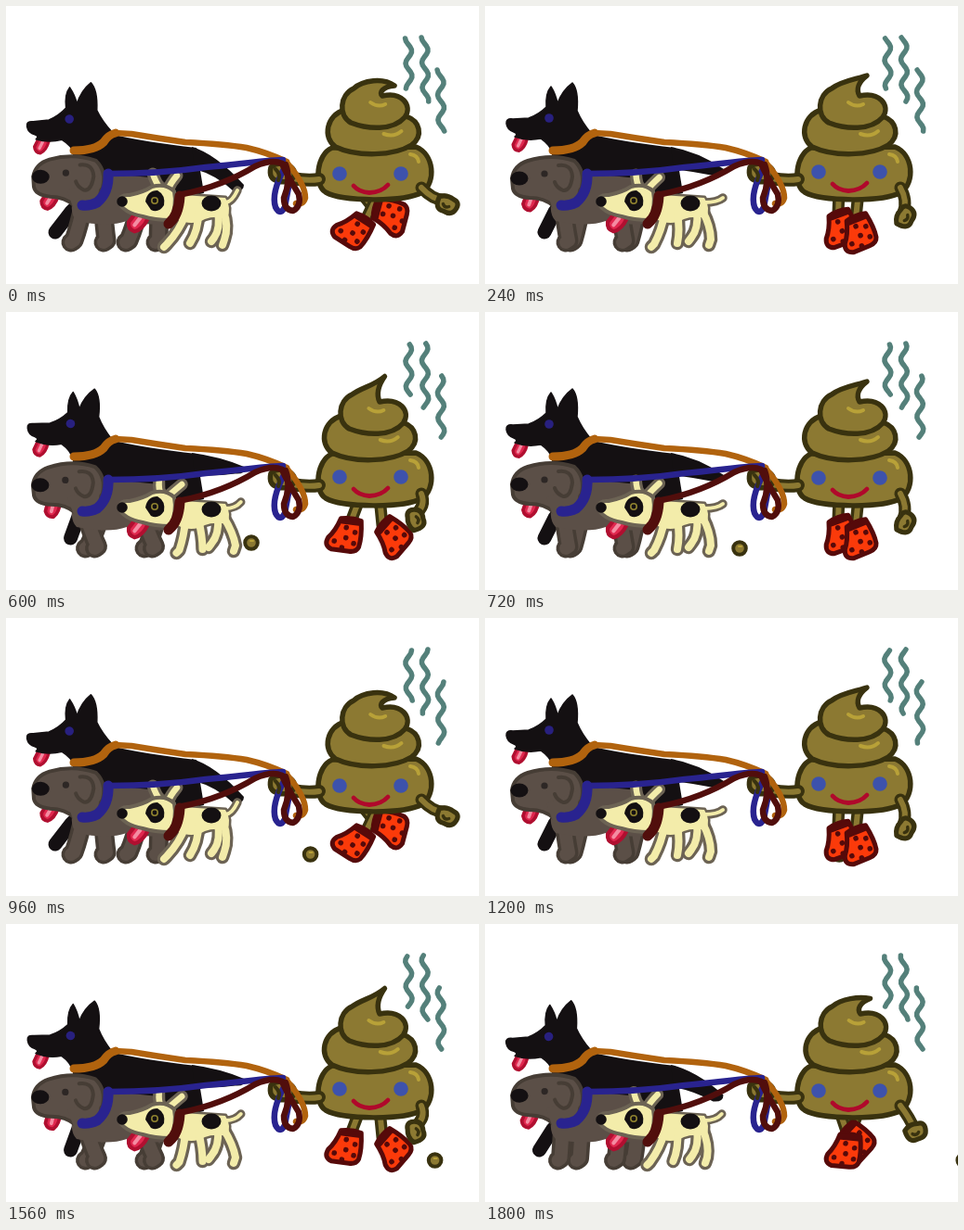
Recreate the animation shown at these times as an HTML page. Size 509 by 300 pixels, loop 1.92 s.

```html
<!DOCTYPE html>
<html lang="en">
<head>
<meta charset="utf-8">
<title>Dog walk</title>
<style>
html, body { margin: 0; width: 100%; height: 100%; overflow: hidden; background: #fff; }
svg { display: block; width: 100vw; height: 100vh; }
</style>
</head>
<body>
<svg id="stage" viewBox="0 0 509 300" fill="none" stroke-linecap="round" stroke-linejoin="round"></svg>
<script>
const STEP = 120, STEPS = 16;
const INK = '#141012', GREY = '#5b4f47', GREY_LINE = '#463d35',
  CREAM = '#f3ecaa', CREAM_LINE = '#6c6354', OLIVE = '#8c7932', OLIVE_LINE = '#39320f',
  SHINE = '#b8a138', EYE = '#3d52ac', ORANGE = '#b1630e', BLUE = '#29238f',
  WINE = '#510e0c', STEAM = '#54807a';

const fill = (d, color) => `<path d="${d}" fill="${color}"/>`;
const line = (d, color, w) => `<path d="${d}" stroke="${color}" stroke-width="${w}"/>`;
const shape = (d, color, edge, w) =>
  `<path d="${d}" fill="${color}" stroke="${edge}" stroke-width="${w}"/>`;
const dot = (x, y, rx, color, ry = rx) =>
  `<ellipse cx="${x}" cy="${y}" rx="${rx}" ry="${ry}" fill="${color}"/>`;
const turn = (a, x, y, s) => `<g transform="rotate(${a} ${x} ${y})">${s}</g>`;
const limb = (d, color, edge, w, inner) => line(d, edge, w) + line(d, color, inner);

function tongue(x, y, a, s = 1) {
  return `<g transform="translate(${x} ${y}) rotate(${a}) scale(${s})">` +
    shape('M-5 -7L5 -7Q7 2 3 7Q-2 9 -5 4Z', '#e0284f', '#b00f30', 3) +
    line('M0 -4L0 3', '#f48ca2', 3) + '</g>';
}

function blackDog(c) {
  const tx = 252 - c, ty = 179 + 17 * c;
  const body = fill('M72 160L112 138Q150 147 205 153L213 202L170 212L130 228L72 215Z', INK);
  const tail = fill(`M200 152Q${229 - 4 * c} ${157 + 2 * c} ${tx + 5} ${ty - 3}` +
    `Q${tx + 5} ${ty + 5} ${tx - 6} ${ty + 4}Q226 ${179 + 3 * c} 203 176Z`, INK);
  const legs = line(`M92 200L${75 - 5 * c} 222L${64 - 11 * c} 244`, INK, 15);
  const head = turn(-2.8 * c, 88, 138,
    tongue(37, 148, 26 + 4 * c, 1.1) +
    shape('M23 127Q22 121 30 122L47 121Q58 117 66 109Q65 94 71 87Q76 95 78 105' +
      'Q83 91 94 83Q101 91 99 113Q104 125 114 137L100 158L72 158' +
      'Q70 150 60 143Q45 146 32 141Q36 138 31 136Q24 134 23 127Z', INK, INK, 1.5) +
    dot(69, 121, 4.8, '#28207f'));
  return legs + body + tail + head + line('M73 156Q96 156 105 147Q110 139 118 137', ORANGE, 9);
}

function greyDog(c) {
  const leg = (hx, fx) => `M${hx} 212Q${(hx + fx) / 2} 238 ${fx} 253L${fx - 3} 255`;
  const legs = [[104, 95 + 13 * c], [84, 90 - 17 * c], [165, 156 + 8 * c], [145, 151 - 19 * c]]
    .map(([h, f]) => limb(leg(h, f), GREY, GREY_LINE, 21, 14)).join('');
  const body = fill('M75 195L104 179Q140 184 165 186Q192 205 180 234Q150 238 130 232Q110 239 76 232Q66 222 75 195Z', GREY);
  const head = turn(1.5 * c, 100, 195,
    tongue(48.5 - 2 * c, 211, 20 + 10 * c, 1.25) +
    shape('M29 186Q31 172 46 167Q72 159 96 167Q108 178 104 196Q92 214 74 216Q64 207 48 207' +
      'Q32 206 30 197Z', GREY, GREY_LINE, 4) +
    fill('M66 200L102 185L98 215L74 222Z', GREY) +
    dot(37, 186, 9.5, INK, 7.5) + dot(64, 181, 3.6, '#2d2725') +
    line('M79 172Q93 170 94 184Q92 200 84 199Q77 196 75 190', GREY_LINE, 4));
  return legs + body + head + line('M110 181Q111 201 98 212Q90 216 82 215', BLUE, 11);
}

function smallDog(c) {
  const legs = [
    `M193 225Q${190 - 3 * c} 242 ${182 - 9 * c} 257L${179 - 9 * c} 260`,
    `M207 224Q${210 - 3 * c} 242 ${207 - 9 * c} 256`,
    `M228 222Q${230 + c} 240 ${222 + 2 * c} 250L${219 + 2 * c} 254`,
    `M234 221Q${243 - 3 * c} 238 ${243 - 8 * c} 252L${241 - 8 * c} 258`
  ];
  const tip = [256 + 2 * c - 9 * c * c, 207 - 8 * c * c];
  const tail = `M236 212Q${tip[0] - 6} 212 ${tip}`;
  const body = 'M176 203Q205 205 236 207Q243 218 238 229Q224 226 214 230Q200 238 184 230Z';
  const ear = (x, tx, ty) => limb(`M${x} 199Q${(x + tx) / 2 - 2} ${ty + 8} ${tx} ${ty}`, CREAM, CREAM_LINE, 13, 6.5);
  const outline = legs.map(d => line(d, CREAM_LINE, 14.5)).join('') +
    line(tail, CREAM_LINE, 9.5) + line(body, CREAM_LINE, 5);
  const inside = fill(body, CREAM) + legs.map(d => line(d, CREAM, 8)).join('') + line(tail, CREAM, 4);
  return outline + inside + dot(221, 213, 10.5, INK, 8.5) +
    tongue(141, 233, 38, 1.4) +
    ear(167, 162.5 - 4.5 * c, 182 - c) + ear(174, 187.5 - 3.5 * c, 185 - 2 * c) +
    shape('M121 211Q123 203 133 204Q148 201 157 195Q172 191 181 200Q184 216 177 231' +
      'Q160 231 147 227Q126 223 121 211Z', CREAM, CREAM_LINE, 4) +
    dot(125, 211, 5.8, INK) + fill('M150 211Q152 199 163 199Q172 204 170 215Q164 224 156 220Z', INK) +
    dot(160, 210, 4, '#8f822f') + dot(160, 210, 2.4, INK) +
    line('M187 205Q186 226 175 235', WINE, 11);
}

function boot(x, y, a) {
  const spots = [[-4, 10], [6, 14], [-3, 21], [-15, 26], [6, 26], [-6, 32]];
  return `<g transform="translate(${x} ${y}) rotate(${a})">` +
    shape('M-11 1Q0 -2 11 1Q14 18 12 29Q10 35 2 35L-17 35Q-26 32 -22 23Q-15 15 -11 1Z', '#fb3a0a', '#560a0a', 5) +
    line('M-9 3L9 3', '#560a0a', 7) +
    spots.map(([sx, sy]) => dot(sx, sy, 2.8, '#560a0a')).join('') + '</g>';
}

function legs(c) {
  const a = [380 + 17 * c, 222 - 3 * c - c * c, -20 - 55 * c];
  const b = [399 - 12 * c, 227 - c + 3 * c * c, -22 + 55 * c];
  const shin = (hx, [x, y]) => limb(`M${hx} 200L${x} ${y + 2}`, OLIVE, OLIVE_LINE, 13, 6);
  return shin(381, a) + shin(402, b) + boot(...a) + boot(...b);
}

function freeArm(c) {
  const hx = 452 + 22 * c, hy = 228 - 14 * c * c;
  const hand = `<g transform="translate(${hx} ${hy}) rotate(${-60 + 85 * c}) scale(1.15)">` +
    shape('M-9 -4Q-3 -9 4 -7Q11 -7 10 0Q9 8 0 7Q-9 9 -9 -4Z', OLIVE, OLIVE_LINE, 4.5) +
    line('M-3 1Q0 4 3 1', OLIVE_LINE, 3) + '</g>';
  return limb(`M447 196Q${455 + 5 * c} 210 ${hx - 2} ${hy - 5}`, OLIVE, OLIVE_LINE, 13, 6) + hand;
}

function walker(c, blink) {
  const m = 2.5 * c, t = 1.2 * c, tx = 411 + 7 * c, ty = 75 + 11 * c;
  const tier = d => shape(d, OLIVE, OLIVE_LINE, 5.5);
  const base = tier('M351 153C334 160 331 193 344 201C362 211 428 212 448 201C463 190 461 160 441 152Z');
  const mid = tier(`M${362 + m} 112C${342 + m} 118 ${338 + m} 142 ${352 + m} 152` +
    `C${375 + m} 163 ${415 + m} 162 ${434 + m} 150C${447 + m} 140 ${443 + m} 124 ${428 + m} 119Z`);
  const top = tier(`M${370 + t} 126C${356 + t} 118 ${358 + t} 96 ${373 + t} 89` +
    `C${383 + c} ${81 - c} ${399 + 7 * c} ${79 - 2 * c} ${tx} ${ty}` +
    `C${402 + 3 * c} ${82 + 5 * c} ${399 + 2 * c} ${90 + 4 * c} ${403 + 2 * c} 97` +
    `C${424 + t} 92 ${437 + t} 107 ${428 + t} 120C${415 + t} 135 ${388 + t} 133 ${370 + t} 126Z`);
  const shine = line(`M${391 + t} 104Q${399 + t} 110 ${407 + t} 106`, SHINE, 4) +
    line(`M${404 + m} 138Q${415 + m} 142 ${423 + m} 135`, SHINE, 4) +
    line('M435 160Q443 161 444 168', SHINE, 4);
  const y = 179 + 2 * c;
  const eyes = [359, 425].map(x => blink
    ? line(`M${x - 6} ${y - 1}Q${x} ${y - 3} ${x + 6} ${y - 1}`, EYE, 3)
    : dot(x, y, 7.8, EYE)).join('');
  const mouth = line(`M374 ${y + 13}Q380 ${y + 20} 391 ${y + 20.5}Q404 ${y + 20} 411 ${y + 12}`, '#b0082b', 4.8);
  return legs(c) + base + mid + top + shine + eyes + mouth + freeArm(c);
}

const heldHand = limb('M308 186Q325 189 337 187', OLIVE, OLIVE_LINE, 14, 6) +
  shape('M285 174Q293 167 303 172Q312 175 310 184Q304 192 293 189Q282 187 285 174Z', OLIVE, OLIVE_LINE, 5.5);

const leashes =
  line('M300 174Q285 202 290 217Q295 227 300 217L304 196', BLUE, 6.5) +
  line('M303 170Q322 192 322 207Q320 215 312 213', ORANGE, 6.5) +
  line('M117 137L135 138Q165 143 193 147Q235 149 259 153Q281 158 302 168', ORANGE, 6.5) +
  line('M110 181C145 181 180 179 215 174C250 171 272 167 298 166', BLUE, 6.5) +
  line('M190 203C225 196 250 184 268 173Q286 165 297 170', WINE, 6.5) +
  line('M297 170Q302 182 315 203Q318 216 309 221Q299 220 299 207Q307 188 301 171', WINE, 6.5) +
  line('M290 176Q296 182 293 188', OLIVE_LINE, 4);

function steam(t) {
  const phase = t / 1920 * 2 * Math.PI;
  return [[433, 35, 54], [450.5, 34, 69], [467.5, 69, 67]].map(([x, y, h]) => {
    let d = '';
    for (let s = 0; s <= h; s += 3) {
      const px = x + s * 0.015 - 3.4 * Math.cos(s / 27 * 2 * Math.PI + phase);
      d += `${s ? 'L' : 'M'}${px.toFixed(2)} ${y + s}`;
    }
    return line(d, STEAM, 5.5);
  }).join('');
}

function dropping(n) {
  if (n < 4) return '';
  const x = n < 6 ? 257 + (n - 4) * 7 : 274 + (n - 6) * 26.8;
  const y = n < 6 ? 241 + (n - 4) * 8 : 255;
  return `<circle cx="${x}" cy="${y}" r="6.8" fill="${OLIVE}" stroke="${OLIVE_LINE}" stroke-width="4"/>` +
    line(`M${x - 1} ${y - 2}L${x + 2} ${y - 2}`, SHINE, 2);
}

const stage = document.getElementById('stage');
let shown = -1;

function draw(now) {
  const n = Math.floor(now / STEP) % STEPS;
  if (n !== shown) {
    shown = n;
    const swing = Math.abs(n % 8 - 4) / 2 - 1;
    stage.innerHTML = steam(n * STEP) + dropping(n) + blackDog(swing) + greyDog(swing) +
      smallDog(swing) + walker(swing, n === 12) + heldHand + leashes;
  }
  requestAnimationFrame(draw);
}
draw(0);
</script>
</body>
</html>
```
